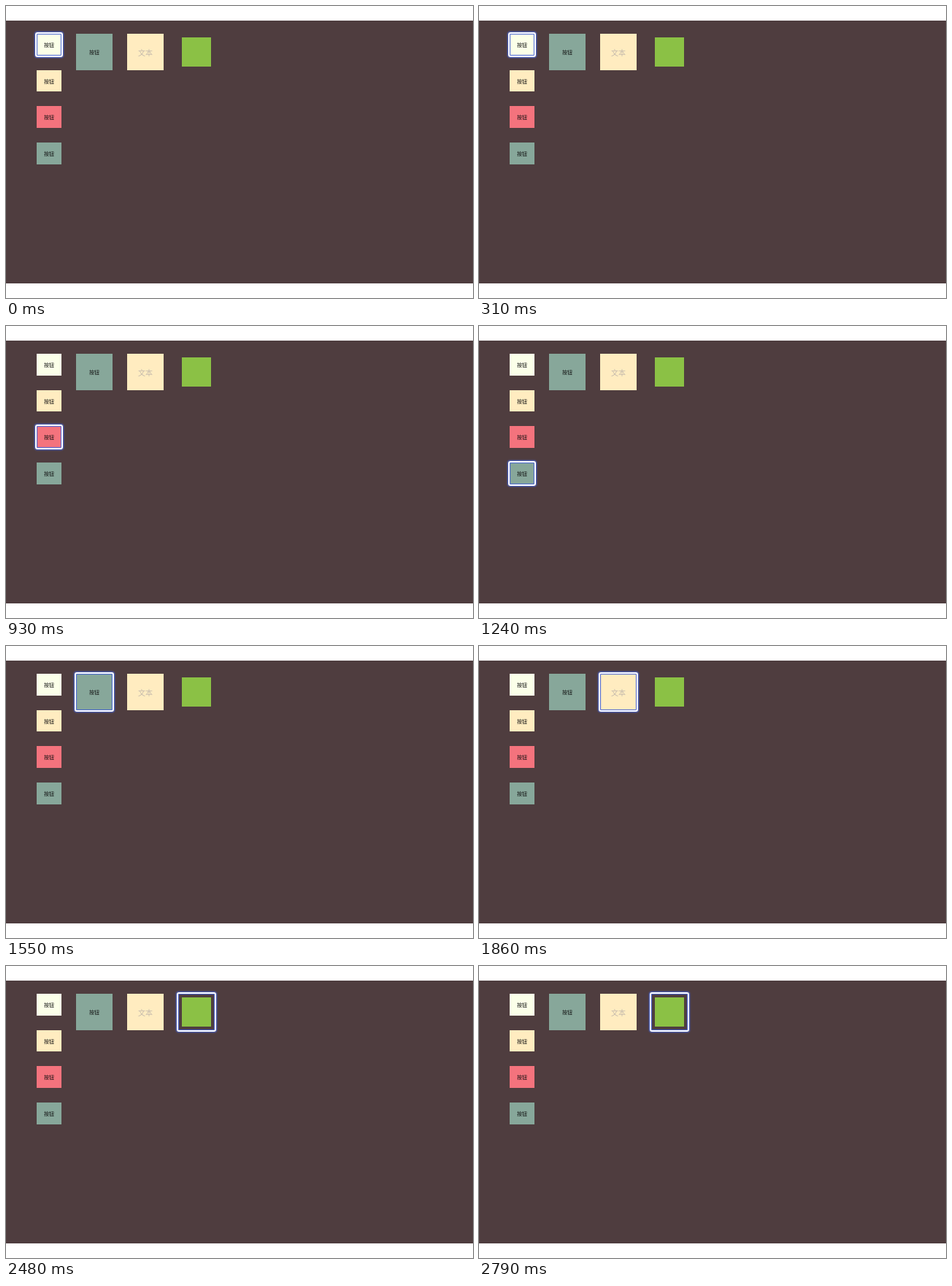
Recreate the animation shown at these times as an HTML page. Size 640 by 400 pixels, loop 3100 ms.

```html
<!DOCTYPE html>
<html lang="zh-CN">
<head>
<meta charset="utf-8">
<style>
html, body { margin: 0; width: 100%; height: 100%; overflow: hidden; background: #fff; }
#panel { position: absolute; left: 0; top: 20px; width: 640px; height: 360px; background: #4f3d3f; }
.item, #ring { position: absolute; box-sizing: border-box; }
.item {
  display: flex; align-items: center; justify-content: center;
  font: 500 7px "Noto Sans CJK SC", "Noto Sans CJK", sans-serif;
  color: #111; white-space: nowrap;
}
.label { font-size: 10px; color: #c3b8ac; }
#ring {
  border: 2px solid #fff; border-radius: 3px;
  box-shadow: 0 0 2px 1px #4a66d6, inset 0 0 1px 1px #4a66d6;
}
</style>
</head>
<body>
<div id="panel"></div>
<script>
const STEP = 310;
const panel = document.getElementById('panel');

// x, y, width, height, colour, text, class
const items = [
  [42, 18, 34, 30, '#fbffe9', '按钮'],
  [42, 67.7, 34, 29.8, '#ffecc0', '按钮'],
  [42, 117.4, 34, 29.6, '#f4737d', '按钮'],
  [42, 167, 34, 29.6, '#87a79a', '按钮'],
  [96, 18, 50, 50, '#87a79a', '按钮'],
  [166, 18, 50, 50, '#ffecc0', '文本', 'label'],
  [236, 18, 50, 50, 'transparent', '']
];
// focused item in each step
const order = [0, 0, 1, 2, 3, 4, 5, 6, 6, 6];

function place(el, x, y, w, h) {
  Object.assign(el.style, { left: x + 'px', top: y + 'px', width: w + 'px', height: h + 'px' });
}

function box(x, y, w, h, colour, text, cls = '') {
  const el = document.createElement('div');
  el.className = 'item ' + cls;
  el.style.background = colour;
  el.textContent = text;
  place(el, x, y, w, h);
  panel.append(el);
}

items.forEach(item => box(...item));
box(241, 23, 40, 40, '#8bc145', '');

const ring = document.createElement('div');
ring.id = 'ring';
panel.append(ring);

function draw(now) {
  const [x, y, w, h] = items[order[Math.floor(now / STEP) % order.length]];
  place(ring, x - 2, y - 2, w + 4, h + 4);
}

let start;
function tick(now) {
  start ??= now;
  draw(Math.max(0, now - start));
  requestAnimationFrame(tick);
}
draw(0);
requestAnimationFrame(tick);
</script>
</body>
</html>
```
